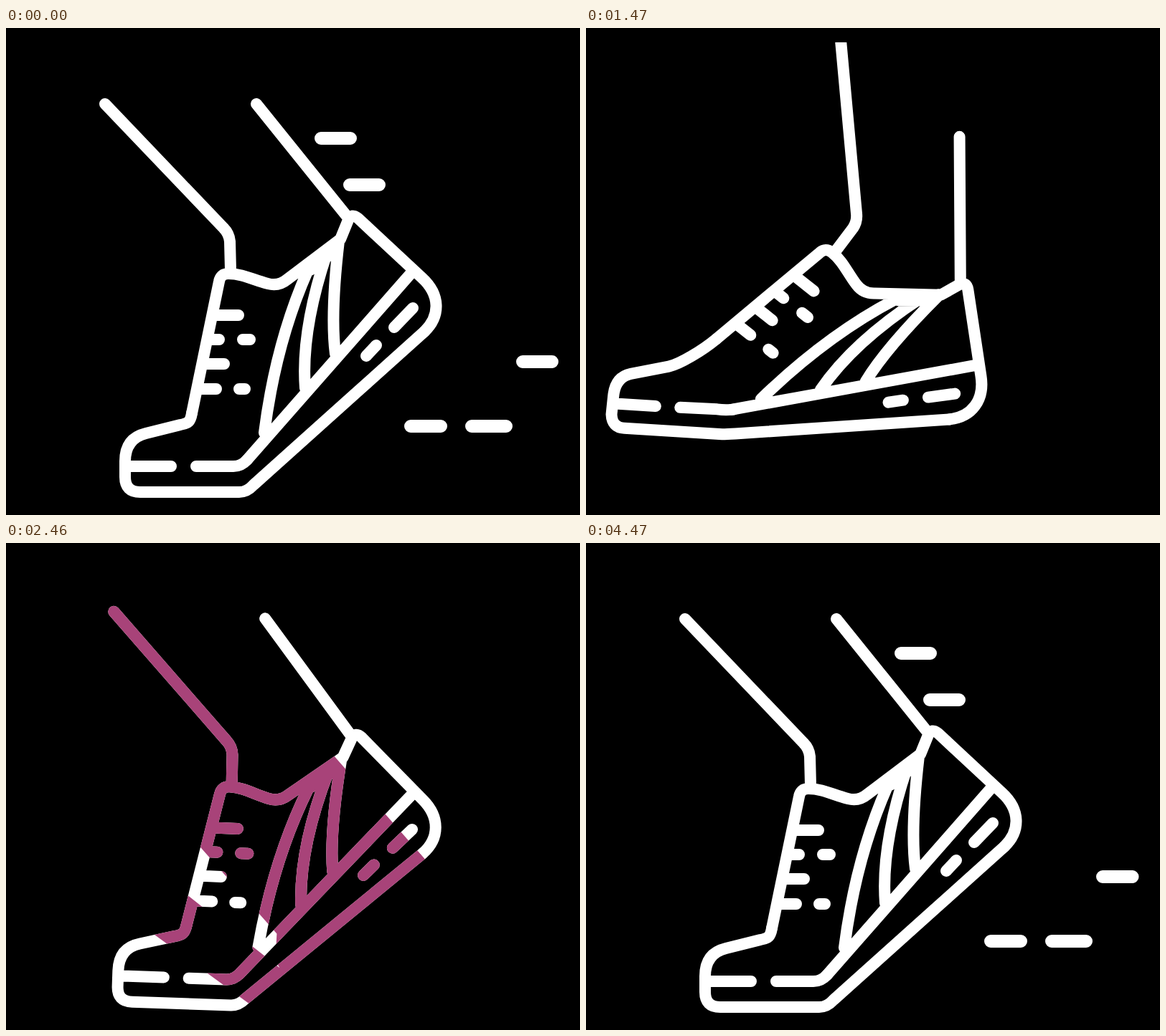
Write an HTML page that moves like this. It is 800 px wide and 680 px high and loops after 4500 ms.

```html
<!DOCTYPE html>
<html lang="en">
<head>
<meta charset="utf-8">
<title>Running shoe</title>
<style>
  html, body { margin: 0; width: 100%; height: 100%; overflow: hidden; background: #000; }
  svg { display: block; width: 100vw; height: 100vh; }
</style>
</head>
<body>
<svg viewBox="0 0 800 680" fill="none" stroke-linecap="round" stroke-linejoin="round">
  <defs>
    <clipPath id="stage"><rect y="20" width="800" height="660"/></clipPath>
    <clipPath id="bars">
      <path id="wide" d="M-300-221L376 547L374 585L700 1100V577L-300-563Z"/>
      <path id="thin" d="M-300 179L520 778V705L-300 58Z"/>
    </clipPath>
  </defs>
  <g clip-path="url(#stage)">
    <g stroke="#fff" stroke-width="16">
      <g id="shoe">
        <path id="rigid"/>
        <path id="toe"/>
      </g>
    </g>
    <g id="tint" clip-path="url(#bars)" stroke="#a84379" stroke-width="16"><use href="#shoe"/></g>
  </g>
  <path id="speed" stroke="#fff" stroke-width="18"/>
</svg>
<script>
const LOOP = 4500;
const el = id => document.getElementById(id);
const clamp = (v, a = 0, b = 1) => Math.min(b, Math.max(a, v));
const ease = (t, a, b) => {
  const x = clamp((t - a) / (b - a));
  return x * x * (3 - 2 * x);
};

// Leg, collar, heel, laces and stripes turn as one piece.
el('rigid').setAttribute('d', [
  'M138 106L303 279Q311 287 312 298L313 338',
  'M349 106L476 264',
  'M259 538L297 354Q299 343 310 343C330 343 345 352 365 357Q380 361 392 351',
  'L466 295L477 268Q482 258 491 266L580 349C605 372 606 402 583 424',
  'M564 343L336 603',
  'M567 391L541 418M516 443L502 458',
  'M420 340Q376 440 360 565M447 315Q411 423 417 503M464 297Q452 400 459 455',
  'M424 338L463 297L447 320Z',
  'M290 401H324M283 435H297M277 469H304M270 504H293M330 435H340M325 504H333'
].join(''));

// The front of the sole, raised and bent.
const toeUp = 'M259 538C257 550 254 552 243 554L195 566Q166 573 166 605L166 627' +
  'Q166 648 187 648L325 648Q336 648 345 638L583 424' +
  'M336 603Q328 612 317 612L265 612M166 612L230 612';
const toeBent = 'M259 538C254 562 241 597 231 609L196 650Q182 667 196 689L210 711' +
  'Q222 725 236 715L348 637Q353 633 362 625L583 424' +
  'M339 600Q331 608 321 614L279 644M202 698L251 664';

const blend = (a, b, k) => {
  const to = b.match(/\d+/g);
  let i = 0;
  return a.replace(/\d+/g, n => (+n + (to[i++] - n) * k).toFixed(2));
};

const swing = (t, a, top, b) => ease(t, a, top) - ease(t, top, b);

function seg(y, a, b, lo = 0, hi = 900) {
  const x1 = Math.max(a, lo), x2 = Math.min(b, hi);
  return x2 > x1 ? `M${x1.toFixed(2)} ${y}H${x2.toFixed(2)}` : '';
}

function speedLines(t) {
  if (t < 900) {
    const k = 1 - ease(t, 600, 900);
    return [[154, 439, 41], [219, 479, 41], [466, 720, 41], [556, 564, 42], [556, 649, 48]]
      .map(([y, x, w]) => seg(y, x, x + w * k)).join('');
  }
  if (t < 2690) return '';
  const left = 1 - ease(t, 2700, 3800);
  let d = '';
  for (const [y, x] of [[154, 439], [219, 479]]) {
    for (const back of [0, 171]) {
      const a = x - back + 498 * left;
      d += seg(y, a, a + 41, x - 11, x + 160);
    }
  }
  if (t > 2850) {
    const x = 820 - 127 * ease(t, 2850, 3390) + 27 * ease(t, 3390, 3780);
    d += seg(466, x, x + 41.5);
  }
  const s = 91 * left, end = 606 + s;
  d += seg(556, end - 71 * clamp((t - 2680) / 120), end, 564);
  d += seg(556, 649 + s, 697 + s, 564, 720);
  return d;
}

function draw(t) {
  const angle = 42.2 * swing(t, 810, 1620, 2610);
  const bend = 1.167 * swing(t, 990, 1620, 2529);
  el('shoe').setAttribute('transform', `rotate(${angle.toFixed(3)} 369 375)`);
  el('toe').setAttribute('d', blend(toeUp, toeBent, bend));

  const move = (t - 2460) * 1.4;
  el('tint').style.display = t > 2200 && t < 2720 ? '' : 'none';
  for (const id of ['wide', 'thin']) {
    el(id).setAttribute('transform', `translate(${move.toFixed(2)} ${(-move).toFixed(2)})`);
  }
  el('speed').setAttribute('d', speedLines(t));
}

const start = performance.now();
function tick() {
  draw((performance.now() - start) % LOOP);
  requestAnimationFrame(tick);
}
tick();
</script>
</body>
</html>
```
